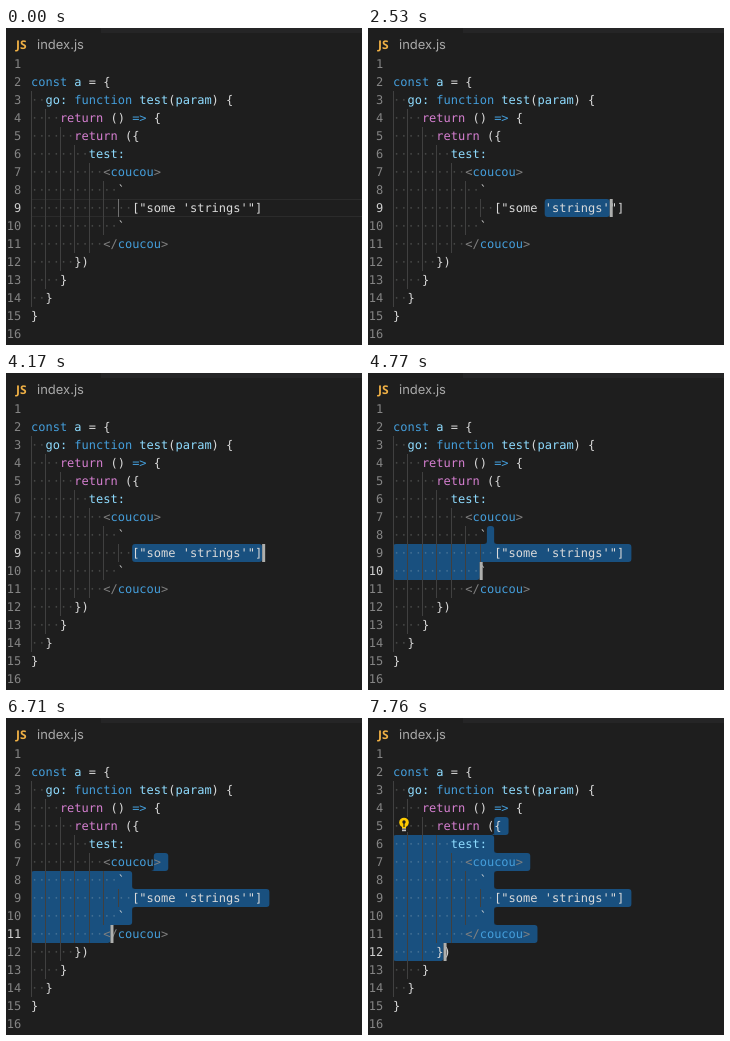
Write an HTML page with a canvas that moves like this. It is 356x317 px and loops after 8000 ms.

```html
<!DOCTYPE html>
<html lang="en">
<head>
<meta charset="utf-8">
<title>Expanding selection</title>
<style>
  html, body { margin: 0; width: 100%; height: 100%; overflow: hidden; background: #1e1e1e; }
  canvas { display: block; }
</style>
</head>
<body>
<canvas id="stage" width="356" height="317"></canvas>
<script>
const ctx = document.getElementById('stage').getContext('2d');
const LOOP = 8000;
const LEFT = 25, TOP = 27, CHAR = 7.224, LINE = 18, RADIUS = 3;
const CODE_FONT = '12px "DejaVu Sans Mono", monospace';
const BG = '#1e1e1e', SELECTION = '#19507f', GUIDE = '#404040', ACTIVE_GUIDE = '#707070';
const COLORS = { k: '#449edb', r: '#d57fd0', v: '#8fdcff', t: '#808080', p: '#dadada' };

// Each line: indent, then [colour key, text] tokens.
const code = [
  [0],
  [0, 'k', 'const ', 'v', 'a', 'p', ' = {'],
  [2, 'v', 'go:', 'k', ' function ', 'v', 'test', 'p', '(', 'v', 'param', 'p', ') {'],
  [4, 'r', 'return', 'p', ' () ', 'k', '=>', 'p', ' {'],
  [6, 'r', 'return', 'p', ' ({'],
  [8, 'v', 'test:'],
  [10, 't', '<', 'k', 'coucou', 't', '>'],
  [12, 'p', '`'],
  [14, 'p', '["some \'strings\'"]'],
  [12, 'p', '`'],
  [10, 't', '</', 'k', 'coucou', 't', '>'],
  [6, 'p', '})'],
  [4, 'p', '}'],
  [2, 'p', '}'],
  [0, 'p', '}'],
  [0]
].map(([indent, ...parts]) => {
  const tokens = [];
  for (let i = 0; i < parts.length; i += 2) tokens.push({ color: COLORS[parts[i]], text: parts[i + 1] });
  return { indent, tokens, length: indent + tokens.reduce((n, t) => n + t.text.length, 0) };
});

// [time, start line, start column, end line, end column]; the caret sits at the end.
const selections = [
  [0, 9, 26, 9, 26],
  [1790, 9, 22, 9, 29],
  [2530, 9, 21, 9, 30],
  [3130, 9, 16, 9, 30],
  [3570, 9, 15, 9, 31],
  [4170, 9, 14, 9, 32],
  [4770, 8, 13, 10, 12],
  [5510, 8, 12, 10, 13],
  [5960, 7, 18, 11, 10],
  [6560, 7, 17, 11, 11],
  [7010, 5, 15, 12, 6],
  [7610, 5, 14, 12, 7]
];

// [time, caret opacity]
const blinks = [
  [0, 0], [290, .96], [440, 1], [590, .5], [740, 0], [1190, .5], [1340, 1], [1640, .5],
  [1790, 1], [2380, .8], [2530, 1], [5360, .8], [5510, 1]
];
const BULB_TIME = 7310;

const latest = (steps, time) => steps.findLast(step => step[0] <= time);
const colX = col => LEFT + col * CHAR;
const lineY = line => TOP + (line - 1) * LINE;

function rect(x, y, w, h, color) {
  ctx.fillStyle = color;
  ctx.fillRect(x, y, w, h);
}

function label(text, x, y, font, color) {
  ctx.font = font;
  ctx.fillStyle = color;
  ctx.fillText(text, x, y);
}

function monoText(text, col, line, color) {
  [...text].forEach((ch, i) => {
    if (ch !== ' ') label(ch, colX(col + i), lineY(line) + 13, CODE_FONT, color);
  });
}

// Concave corner beside a row; dx and dy point away from the corner point.
function fillet(x, y, dx, dy) {
  ctx.beginPath();
  ctx.moveTo(x, y);
  ctx.lineTo(x + dx * RADIUS, y);
  ctx.quadraticCurveTo(x, y, x, y + dy * RADIUS);
  ctx.fill();
}

function drawSelection([, startLine, startCol, endLine, endCol]) {
  const rows = [];
  for (let line = startLine; line <= endLine; line++) {
    rows.push({
      y: lineY(line),
      left: colX(line === startLine ? startCol : 0),
      right: colX(line === endLine ? endCol : code[line - 1].length + 1)
    });
  }
  ctx.fillStyle = SELECTION;
  rows.forEach((row, i) => {
    const round = (near, side) => {
      if (!near) return RADIUS;
      if (near[side] === row[side]) return 0;
      const inner = side === 'left' ? row.left > near.left : near.left < row.right && row.right < near.right;
      if (!inner) return RADIUS;
      const below = near.y > row.y;
      fillet(row[side], row.y + (below ? LINE : 0), side === 'left' ? -1 : 1, below ? -1 : 1);
      return 0;
    };
    const above = rows[i - 1], below = rows[i + 1];
    const radii = [round(above, 'left'), round(above, 'right'), round(below, 'right'), round(below, 'left')];
    ctx.beginPath();
    ctx.roundRect(row.left, row.y, row.right - row.left, LINE, radii);
    ctx.fill();
  });
}

function drawHeader() {
  rect(95, 0, 261, 5, '#252526');
  label('JS', 10, 21, 'bold 12px "Open Sans", sans-serif', '#efb045');
  label('index.js', 31, 21, '13px Inter, sans-serif', '#a9a9a9');
}

function drawCode(caretLine, selecting) {
  code.forEach(({ indent, tokens }, i) => {
    const line = i + 1, number = String(line);
    monoText(number, -1.36 - number.length, line, line === caretLine ? '#d0d0d0' : '#858585');
    for (let col = 0; col < indent; col += 2) {
      const active = !selecting && line === caretLine && col === indent - 2;
      rect(Math.round(colX(col)), lineY(line), 1, LINE, active ? ACTIVE_GUIDE : GUIDE);
    }
    monoText('·'.repeat(indent), 0, line, 'rgba(227,228,226,.2)');
    let col = indent;
    for (const { text, color } of tokens) {
      monoText(text, col, line, color);
      col += text.length;
    }
  });
}

function disc(x, y, r, color) {
  ctx.fillStyle = color;
  ctx.beginPath();
  ctx.arc(x, y, r, 0, 7);
  ctx.fill();
}

function drawBulb() {
  rect(32, 99, 8, 15, BG);
  disc(36, 104.5, 4.8, '#fc0');
  rect(34, 107, 4, 3.5, '#fc0');
  disc(36, 104, 1.7, BG);
  rect(35.4, 104, 1.2, 5, BG);
  rect(34, 110.5, 4, 1, '#c5c5c5');
  rect(34, 112, 4, 1.2, '#c5c5c5');
}

function draw(time) {
  const selection = latest(selections, time);
  const [, startLine, startCol, caretLine, caretCol] = selection;
  const selecting = startLine !== caretLine || startCol !== caretCol;

  rect(0, 0, 356, 317, BG);
  drawHeader();
  if (selecting) {
    drawSelection(selection);
  } else {
    rect(LEFT, lineY(caretLine), 331, 1, '#2b2b2b');
    rect(LEFT, lineY(caretLine) + LINE - 1, 331, 1, '#2b2b2b');
  }
  drawCode(caretLine, selecting);
  if (time >= BULB_TIME) drawBulb();

  ctx.globalAlpha = latest(blinks, time)[1];
  rect(colX(caretCol), lineY(caretLine), 3, LINE, '#aeafad');
  ctx.globalAlpha = 1;
}

ctx.textRendering = 'geometricPrecision';
const start = performance.now();
function tick() {
  draw((performance.now() - start) % LOOP);
  requestAnimationFrame(tick);
}
tick();
</script>
</body>
</html>
```
